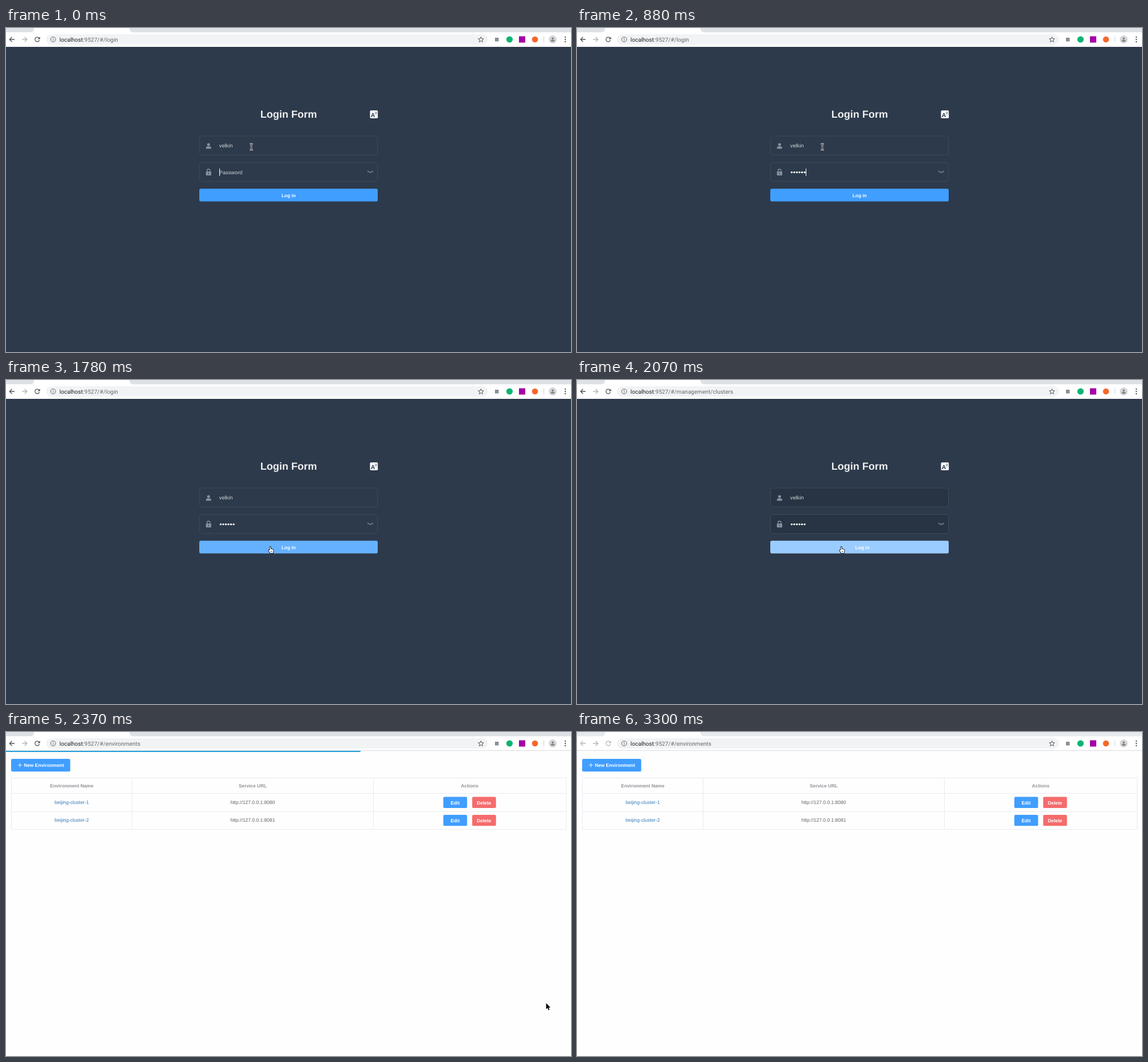
Recreate the animation shown at these times as an HTML page with a canvas. Size 988 by 567 pixels, loop 3400 ms.

```html
<!DOCTYPE html>
<html lang="en">
<head>
<meta charset="utf-8">
<title>Login</title>
<style>
html, body { margin: 0; width: 100%; height: 100%; overflow: hidden; background: #fff; }
canvas { display: block; width: 988px; height: 567px; }
</style>
</head>
<body>
<canvas id="stage" width="988" height="567"></canvas>
<script>
const c = document.getElementById('stage').getContext('2d');
const LOOP = 3400;
const SANS = '"Liberation Sans", Arial, sans-serif';
const URL_FONT = '10.05px Roboto, sans-serif';
const BOLD = `bold 8.32px ${SANS}`;
const CELL = `8.5px ${SANS}`;
const BLUE = '#409eff', NAVY = '#2d3a4b';

// Start times of each state.
const dotTimes = [150, 290, 590, 730, 730, 880];
const pointer = [
  [0, 'beam', 429, 208],
  [1180, 'arrow', 430.5, 224.5],
  [1330, 'beam', 441.5, 268.5],
  [1480, 'arrow', 448.5, 274.5],
  [1630, 'hand', 459, 291],
  [2220, 'arrow', 935.5, 470.5],
  [2370, 'arrow', 944.5, 474.5],
  [2520, 'arrow', 978.5, 554.5],
  [2670, 'arrow', 978.5, 562.5],
  [2850, 'none', 0, 0]
];

function rect(x, y, w, h, fill) {
  c.fillStyle = fill;
  c.fillRect(x, y, w, h);
}

function round(x, y, w, h, r, fill, stroke) {
  c.beginPath();
  c.roundRect(x, y, w, h, r);
  if (fill) { c.fillStyle = fill; c.fill(); }
  if (stroke) { c.strokeStyle = stroke; c.lineWidth = 1; c.stroke(); }
}

function disc(x, y, r, fill) {
  c.beginPath();
  c.arc(x, y, r, 0, 7);
  c.fillStyle = fill;
  c.fill();
}

function text(s, x, y, font, fill, align = 'center') {
  c.font = font;
  c.textAlign = align;
  c.fillStyle = fill;
  c.fillText(s, x, y);
}

function path(d, x, y, stroke, width, fill) {
  const p = new Path2D(d);
  c.save();
  c.translate(x, y);
  c.lineJoin = 'round';
  if (stroke) { c.strokeStyle = stroke; c.lineWidth = width; c.stroke(p); }
  if (fill) { c.fillStyle = fill; c.fill(p); }
  c.restore();
}

function person(x, y, s, fill) {
  disc(x, y - 2.2 * s, 2.5 * s, fill);
  round(x - 4.7 * s, y + 1.1 * s, 9.4 * s, 4 * s, [3 * s, 3 * s, s, s], fill);
}

function drawBrowser(t) {
  const idle = t >= 3300;
  const strip = idle ? '#e7eaed' : '#dee1e6';
  const nav = idle ? '#b4b6b9' : '#505357';
  rect(0, 0, 988, 33, '#fff');
  round(-6, -6, 55, 13.5, [0, 0, 6, 0], strip);
  round(216, -6, 780, 13.5, [0, 0, 0, 6], strip);

  const arrow = 'M4.5 0H-4M0-4.2L-4.2 0L0 4.2';
  path(arrow, 10.5, 20, nav, 1.3);
  c.save();
  c.translate(32.5, 20);
  c.scale(-1, 1);
  path(arrow, 0, 0, '#b4b6b9', 1.3);
  c.restore();
  c.beginPath();
  c.arc(54.7, 20, 3.9, 0.35, 5.5);
  c.strokeStyle = nav;
  c.lineWidth = 1.3;
  c.stroke();
  path('M4.8-4.8V-.5H.5Z', 54.7, 20, null, 0, nav);

  round(70, 11, 773, 18, 9, '#f1f3f4');
  c.beginPath();
  c.arc(82.5, 20, 4.4, 0, 7);
  c.strokeStyle = '#5f6368';
  c.lineWidth = 1;
  c.stroke();
  rect(82, 19.4, 1, 3, '#5f6368');
  rect(82, 17.4, 1, 1.1, '#5f6368');

  const page = t < 2070 ? 'login' : t < 2220 ? 'management/clusters' : 'environments';
  text('localhost', 93.5, 23.6, URL_FONT, '#202124', 'left');
  const w = c.measureText('localhost').width;
  text(':9527/#/' + page, 93.5 + w, 23.6, URL_FONT, '#66696d', 'left');

  path('M0-4.6L1.3-1.5L4.7-1.3L2.1.9L2.9 4.2L0 2.4L-2.9 4.2L-2.1.9L-4.7-1.3L-1.3-1.5Z', 830.5, 20.2, '#505357', 1);
  rect(855, 17, 6.5, 6.5, '#8d8f92');
  disc(880.5, 20, 5.6, '#08b573');
  rect(897, 14.5, 11, 11, '#a400a8');
  disc(925, 20, 5.3, '#f4692b');
  rect(940, 15, 1, 10, '#cfd2d6');
  disc(956, 20, 7, '#d5d7da');
  person(956, 20, 0.72, '#7d8085');
  for (const y of [16, 20, 24]) disc(978, y, 1.15, '#505357');
}

function drawField(y, dark) {
  round(338.5, y, 311, 33, 3.5, dark ? '#283443' : NAVY, '#3d4959');
}

function drawLogin(t) {
  const busy = t >= 2070;
  const grey = '#8793a0';
  rect(0, 33, 988, 534, NAVY);
  text('Login Form', 494.3, 157.4, `bold 18px ${SANS}`, '#eee');

  round(636.5, 144.3, 13.7, 13.7, 1.8, '#fff');
  text('A', 641.6, 155.8, `bold 10.5px ${SANS}`, NAVY);
  text('文', 647, 150.8, '5.5px "Noto Sans CJK SC", "Noto Sans CJK", sans-serif', NAVY);

  drawField(189, busy);
  drawField(235.5, busy);
  person(354.2, 206.2, 1, grey);
  text('velkin', 372.8, 209.4, `9.24px ${SANS}`, '#d3d6da', 'left');

  path('M-2.6 0V-2.2A2.6 2.6 0 0 1 2.6-2.2V0', 354.2, 251.8, grey, 1.3);
  round(349.6, 251.3, 9.2, 6.8, 1, grey);
  rect(353.6, 253.4, 1.2, 2.6, NAVY);
  path('M-5-2Q0 3 5-2M-3.4-.4L-4.8 1.2M-1.2.4L-1.7 2.4M1.2.4L1.7 2.4M3.4-.4L4.8 1.2', 637, 251.6, grey, 1);

  const dots = dotTimes.filter(d => t >= d).length;
  if (!dots) text('Password', 372.8, 255.9, `9.24px ${SANS}`, '#cdd1d6', 'left');
  for (let i = 0; i < dots; i++) disc(375.4 + 4.53 * i, 252.6, 1.7, '#fff');
  if (t < 1480 || (t >= 1930 && !busy)) {
    rect(Math.floor(373.2 + 4.53 * dots), 246, 1, 13, '#fff');
  }

  const fill = busy ? '#9bccff' : t >= 1780 ? '#66b1ff' : BLUE;
  round(338, 281.3, 312, 22.3, 2.8, fill);
  text('Log in', busy ? 499 : 494.2, 295.6, BOLD, '#fff');
}

function action(label, x, y, fill) {
  round(x, y, 41.6, 19.4, 2, fill);
  text(label, x + 20.6, y + 12.9, BOLD, '#fff');
}

function drawEnvironments(t) {
  const loaded = t >= 2370;
  const bottom = loaded ? 170 : 149;
  const line = '#e8ebf1';
  rect(0, 33, 988, 534, '#fefefe');
  rect(0, 32, 988, 1, '#d8dadd');

  const bar = t < 2370 ? 122 : t < 2520 ? 620 : 0;
  if (bar) rect(0, 33, bar, 2, '#22a0dd');

  round(9, 47, 103.3, 22.3, 2.5, BLUE);
  path('M-3.5 0H3.5M0-3.5V3.5', 24.4, 58, '#fff', 0.9);
  text('New Environment', 66.3, 61.1, BOLD, '#fff');

  for (const x of [9, 220, 642, 979]) {
    rect(x, 80, 1, (loaded || x === 9 || x === 979 ? bottom : 107) - 80, line);
  }
  for (const y of loaded ? [80, 107, 139, 170] : [80, 107, 149]) rect(9, y, 971, 1, line);

  text('Environment Name', 115, 97.1, BOLD, '#909399');
  text('Service URL', 431.5, 97.1, BOLD, '#909399');
  text('Actions', 810.8, 97.1, BOLD, '#909399');

  if (!loaded) {
    text('No Data', 494.5, 131.7, `8.32px ${SANS}`, '#909399');
    return;
  }
  for (let i = 0; i < 2; i++) {
    const y = 31.3 * i;
    text('beijing-cluster-' + (i + 1), 115, 125.6 + y, CELL, '#337ab7');
    text('http://127.0.0.1:808' + i, 431.5, 125.6 + y, CELL, '#606266');
    action('Edit', 764.7, 113.6 + y, BLUE);
    action('Delete', 815.2, 113.6 + y, '#f56c6c');
  }
}

const shapes = {
  beam(x, y) {
    const d = 'M-2.6-5.2Q0-5.2 0-3.6Q0-5.2 2.6-5.2M0-3.6V3.6M-2.6 5.2Q0 5.2 0 3.6Q0 5.2 2.6 5.2M-1.5 1H1.5';
    path(d, x, y, '#fff', 2.4);
    path(d, x, y, '#111', 1);
  },
  arrow(x, y) {
    path('M0 0V10.6L2.5 8.3L4.2 12.2L6 11.4L4.3 7.7H7.6Z', x, y, '#fff', 1.3, '#000');
  },
  hand(x, y) {
    path('M3 7V1.6Q3.7.2 4.5 1.6V5Q5.5 4.3 6 5.3Q7 4.6 7.4 5.7Q9 5.2 9 7V8.8L8 12H3.8L1 8Q.4 6.2 1.8 6.3Z', x - 0.5, y, '#000', 1.6, '#fff');
    path('M4.8 8.2V10.3M6.3 8.2V10.3', x - 0.5, y, '#000', 0.6);
  },
  none() {}
};

function draw(t) {
  c.textRendering = 'geometricPrecision';
  drawBrowser(t);
  (t < 2220 ? drawLogin : drawEnvironments)(t);
  const [, kind, x, y] = pointer.filter(p => t >= p[0]).pop();
  shapes[kind](x, y);
}

const start = performance.now();
function tick() {
  draw((performance.now() - start) % LOOP);
  requestAnimationFrame(tick);
}
tick();
</script>
</body>
</html>
```
